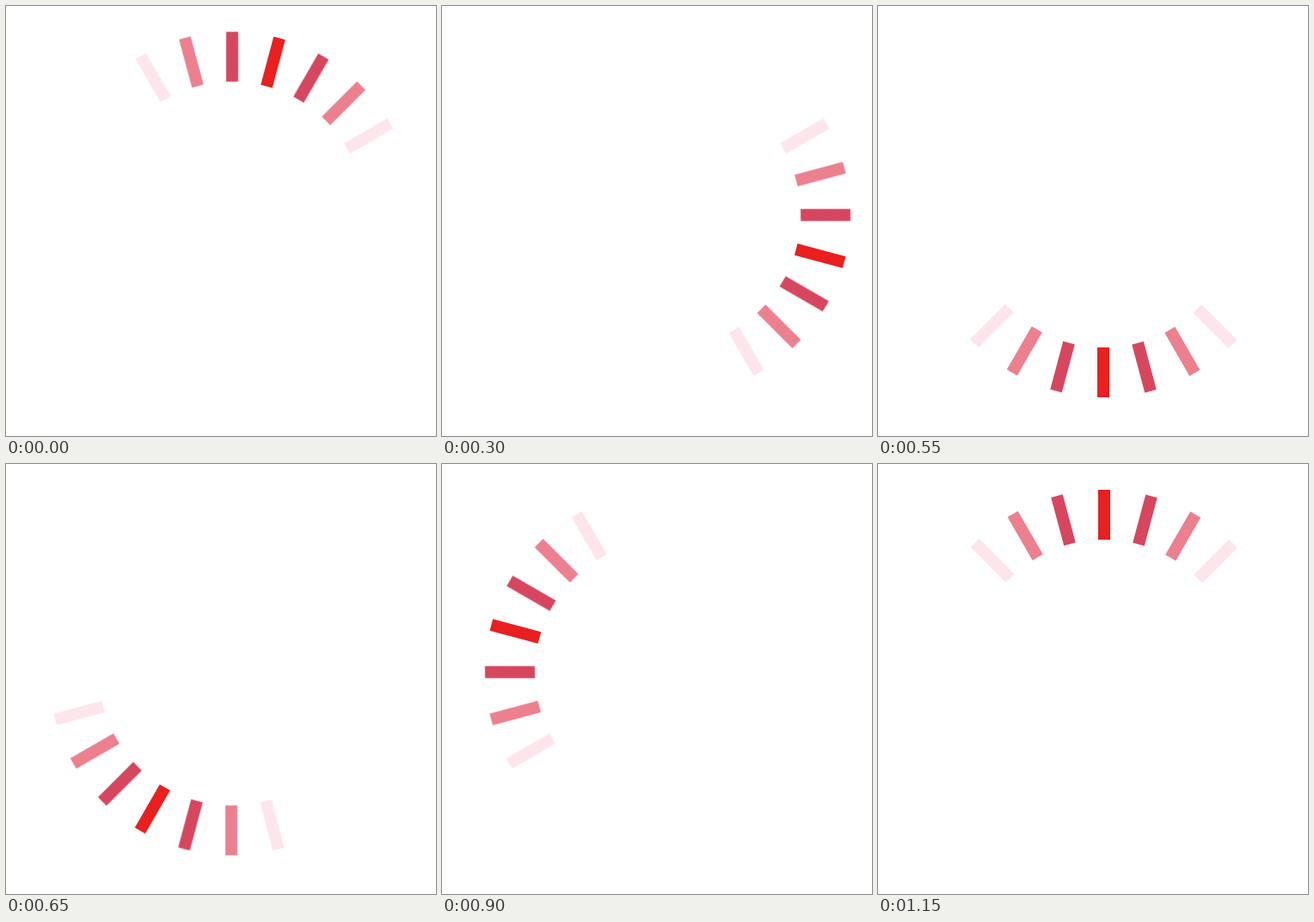
An HTML page that plays this animation: 500x500 px, repeating every 1.2 s.

```html
<!DOCTYPE html>
<html lang="en">
<head>
<meta charset="utf-8">
<title>Spinner</title>
<style>
  html, body { margin: 0; width: 100%; height: 100%; overflow: hidden; background: #fff; }
  svg { display: block; width: 100vw; height: 100vh; }
  #wheel { transform-box: view-box; transform-origin: 262.5px 242.5px; }
</style>
</head>
<body>
<svg viewBox="0 0 500 500"><g id="wheel"></g></svg>
<script>
  const STEP = 15;
  const STEPS = 360 / STEP;
  const STEP_MS = 50;
  const COLORS = ['#e91f20', '#d6475f', '#ec808f', '#fce6ec'];
  const wheel = document.getElementById('wheel');

  // Seven bars, fading symmetrically away from the bright one
  for (let i = -3; i <= 3; i++) {
    const bar = document.createElementNS('http://www.w3.org/2000/svg', 'rect');
    const attrs = {
      x: 256, y: 30, width: 14, height: 58,
      fill: COLORS[Math.abs(i)],
      transform: `rotate(${i * STEP} 262.5 242.5)`
    };
    for (const key in attrs) bar.setAttribute(key, attrs[key]);
    wheel.append(bar);
  }

  wheel.animate(
    [{ transform: `rotate(${STEP}deg)` }, { transform: `rotate(${360 + STEP}deg)` }],
    { duration: STEPS * STEP_MS, iterations: Infinity, easing: `steps(${STEPS}, end)` }
  );
</script>
</body>
</html>
```
